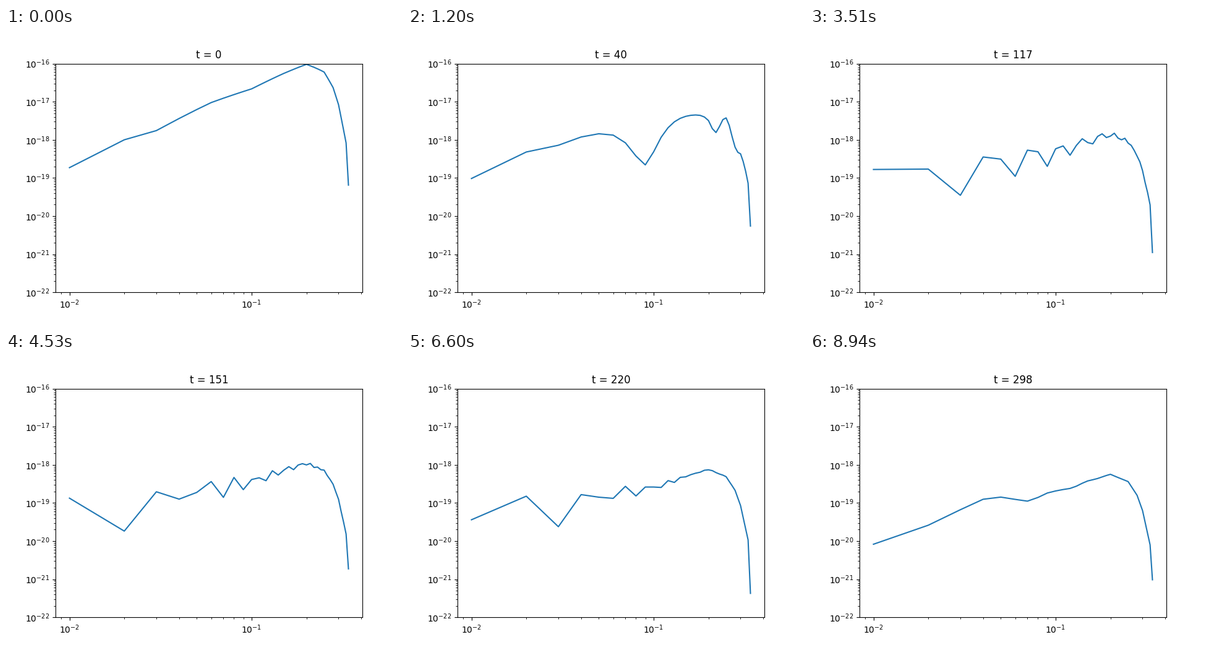
A matplotlib script for the animation above (8970 ms loop, 640 by 480 pixels).

```python
import matplotlib.pyplot as plt
import numpy as np
from matplotlib.animation import FuncAnimation
from matplotlib.ticker import NullFormatter

STEPS = 299

n = np.arange(1, 35)
k = n / 100

# Amplitude in log-log space: a slow rise, a peak at k = 0.2, a steep cutoff.
BENDS = [0.01, 0.02, 0.03, 0.06, 0.1, 0.2, 0.25, 0.28, 0.3, 0.33, 0.34]
LEVELS = [-16.67, -16.4, -16.43, -16.1, -15.97, -15.53, -15.72, -16.08, -16.48, -17.38, -18.45]
amplitude = 10 ** np.interp(np.log(k), np.log(BENDS), LEVELS)

omega = np.pi / 3.6 * (k + 0.003)              # phase speed at the bin's mean k
hold = np.exp(-((k - 0.2) / 0.06) ** 2)        # bins near the peak keep their lag
onset = 1 + 2 * (1 - np.exp(-(k / 0.1) ** 2))  # start of the 1/t decay
floor = np.minimum(0.15, 4.5e-5 * n**3.0)      # power left at a zero crossing


def spectrum(t):
    """Standing waves decaying as 1/t, whose bins gradually lose coherence."""
    lag = 8 * (hold + (1 - hold) * np.exp(-t / 20))
    theta = omega * (t - lag)
    coherence = np.exp(-(abs(theta) / 15) ** 1.3)
    coherence[-1] = 0.75  # a few modes only, so they stay in phase
    swing = (1 - coherence * np.cos(2 * theta)) / 2
    return amplitude * (floor + (1 - floor) * swing) / (t + onset)


fig, ax = plt.subplots(figsize=(6.4, 4.8), dpi=100)
line, = ax.loglog(k, spectrum(0))
ax.set_ylim(1e-22, 1e-16)
ax.set_xlim(ax.get_xlim())
for axis in (ax.xaxis, ax.yaxis):
    axis.set_minor_formatter(NullFormatter())
title = ax.set_title("t = 0")


def update(t):
    line.set_ydata(spectrum(t))
    title.set_text(f"t = {t}")
    return line, title


anim = FuncAnimation(fig, update, frames=STEPS, interval=30, repeat=True)
plt.show()
```
